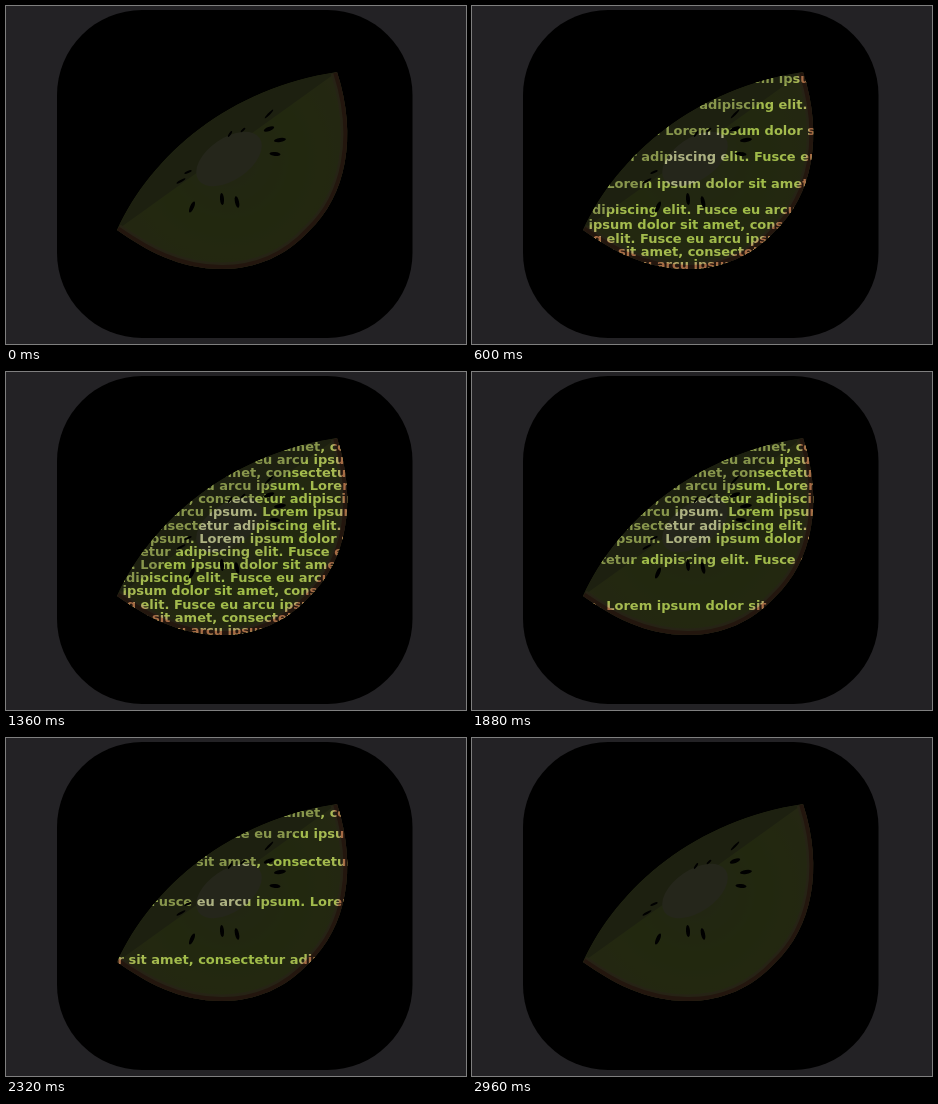
An HTML page with a canvas that plays this animation: 460x338 px, repeating every 3.08 s.

```html
<!DOCTYPE html>
<html lang="en">
<head>
<meta charset="utf-8">
<title>Falling lines</title>
<style>
html, body { margin: 0; width: 100%; height: 100%; overflow: hidden; background: #232225; }
canvas { display: block; }
</style>
</head>
<body>
<canvas id="stage" width="460" height="338"></canvas>
<script>
const W = 460, H = 338, LOOP = 3080, STEP = 40;
const PITCH = 13.15, FIRST_BASELINE = 78.7;
const PHRASE = 'Lorem ipsum dolor sit amet, consectetur adipiscing elit. Fusce eu arcu ipsum. '.repeat(2);
// Left edge of each line, top to bottom
const LEFT = [112, -214, 48, -271.5, -19.5, -319, -76, -382, -134, -441, -192, 66, -248, 4, -300];

const ctx = document.getElementById('stage').getContext('2d');

function layer() {
  const c = document.createElement('canvas');
  c.width = W;
  c.height = H;
  return c.getContext('2d');
}

const UPPER = 'M111 224C146 148 224 82 331 66';
const LOWER = 'C352 131 340 190 303 225C280 250 250 263 216 263C172 263 140 244 111 224';

function drawSlice() {
  const g = layer();
  const ellipse = (x, y, rx, ry, angle, color) => {
    g.fillStyle = color;
    g.beginPath();
    g.ellipse(x, y, rx, ry, angle, 0, 7);
    g.fill();
  };

  g.clip(new Path2D(UPPER + LOWER + 'Z'));
  const flesh = g.createRadialGradient(223, 153, 20, 223, 153, 125);
  flesh.addColorStop(0, '#a2b457');
  flesh.addColorStop(0.45, '#a0bd48');
  flesh.addColorStop(1, '#a8b954');
  g.fillStyle = flesh;
  g.fillRect(0, 0, W, H);

  g.fillStyle = '#88964c';
  g.fill(new Path2D(UPPER + 'L111 224Z'));

  const rim = new Path2D('M331 66' + LOWER);
  g.strokeStyle = '#b3a765';
  g.lineWidth = 13;
  g.stroke(rim);
  g.strokeStyle = '#a56b45';
  g.lineWidth = 8;
  g.stroke(rim);

  ellipse(223, 153, 37, 21, -0.6, '#adb282');

  // Seeds: x, y, half length, angle
  [[186, 201, 6, -1.15], [216, 193, 6, 1.5], [231, 196, 6, 1.35],
   [263, 123, 5.5, -0.35], [274, 134, 6, -0.15], [269, 148, 5.5, 0.1],
   [224, 128, 3.5, -1], [237, 124, 3, -0.7], [263, 108, 6, -0.8],
   [175, 175, 5, -0.5], [182, 166, 4, -0.4]]
    .forEach(([x, y, r, a], i) => ellipse(x, y, r, i < 6 ? 2 : 1.1, a, '#000'));
  return g.canvas;
}

const slice = drawSlice();
const text = layer();
text.font = 'bold 13px "DejaVu Sans", Verdana, sans-serif';

// Lower lines land first and leave first, and move faster
function shift(i, t) {
  const speed = 0.225 * 1.052 ** i;
  const landing = 600 + (132.5 - 13 * i) / speed;
  if (t < landing) return (t - landing) * speed;
  const leave = 2253 - 53 * i + 37 * 0.2 ** i;
  return (Math.max(0, t - leave) / (45 * 0.893 ** i)) ** 2;
}

function drawText(t) {
  text.globalCompositeOperation = 'source-over';
  text.clearRect(0, 0, W, H);
  text.fillStyle = '#000';
  LEFT.forEach((x, i) => text.fillText(PHRASE, x, FIRST_BASELINE + PITCH * i + shift(i, t)));
  text.globalCompositeOperation = 'source-in';
  text.drawImage(slice, 0, 0);
}

function frame(now) {
  const t = Math.floor(now % LOOP / STEP) * STEP;
  ctx.fillStyle = '#232225';
  ctx.fillRect(0, 0, W, H);
  ctx.fillStyle = '#000';
  ctx.beginPath();
  ctx.roundRect(51, 4, 355.5, 328, 85);
  ctx.fill();

  ctx.globalAlpha = 0.21;
  ctx.drawImage(slice, 0, 0);
  ctx.globalAlpha = 1;
  drawText(t);
  ctx.drawImage(text.canvas, 0, 0);
  requestAnimationFrame(frame);
}
requestAnimationFrame(frame);
</script>
</body>
</html>
```
